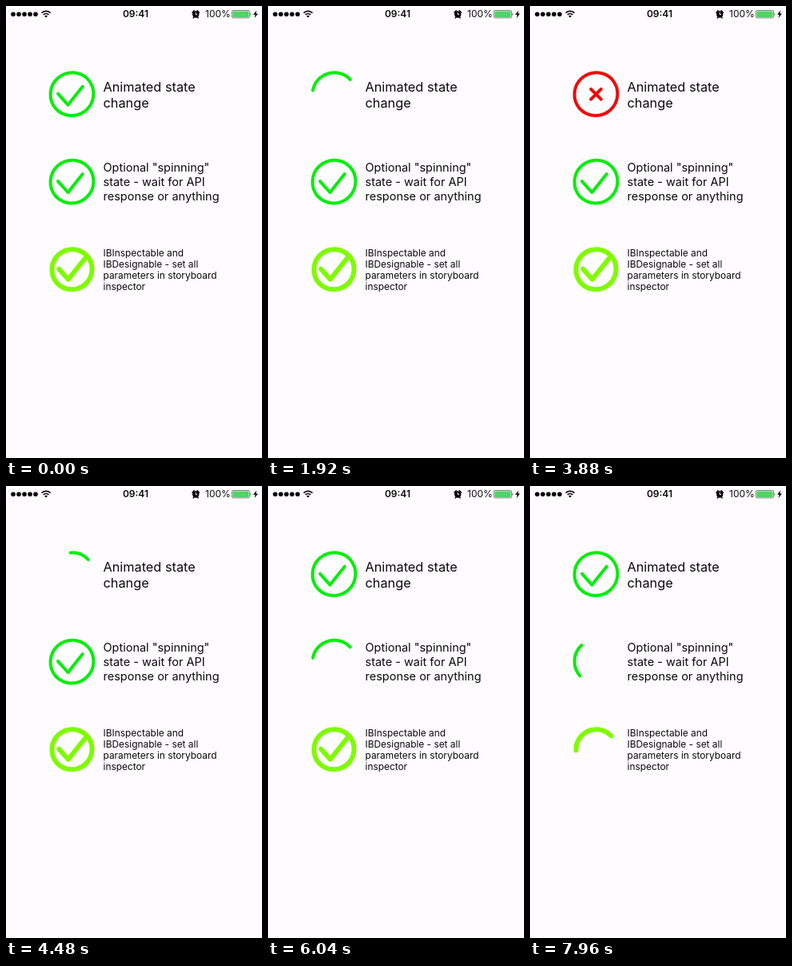
An HTML page that plays this animation: 320 by 565 pixels, repeating every 8000 ms.

```html
<!DOCTYPE html>
<html lang="en">
<head>
<meta charset="utf-8">
<title>State switches</title>
<style>
  html, body { margin: 0; width: 100%; height: 100%; overflow: hidden; background: #fefcfe; }
  svg { display: block; width: 100%; height: 100%; }
  text { font-family: Inter, Roboto, sans-serif; fill: #0a0a0a; }
  .switch path { fill: none; stroke-linecap: round; stroke-linejoin: round; }
</style>
</head>
<body>
<svg id="stage" viewBox="0 0 320 565">
  <g id="status">
    <g fill="none" stroke="#0a0a0a" stroke-width="1.7">
      <path d="M44.6 8.6a7.8 7.8 0 0 1 11 0M46.8 10.9a4.7 4.7 0 0 1 6.6 0"/>
    </g>
    <path d="M50.1 14.6l-1.9-2a2.7 2.7 0 0 1 3.8 0z"/>
    <text x="162" y="14.3" font-size="12" font-weight="600" text-anchor="middle">09:41</text>
    <circle cx="237.2" cy="10.5" r="4.2"/>
    <path d="M233 8.2l2.2-2.4M241.4 8.2l-2.2-2.4M234.3 14.8l1-1.4M240.1 14.8l-1-1.4" stroke="#0a0a0a" stroke-width="1.6" stroke-linecap="round"/>
    <path d="M237.2 8v2.7h2" fill="none" stroke="#fefcfe"/>
    <text x="249" y="14.3" font-size="12">100%</text>
    <rect x="282.2" y="5.5" width="22.4" height="9.4" rx="1.8" fill="#fefcfe" stroke="#5b6a5e" stroke-width=".8"/>
    <rect x="283.2" y="6.5" width="20.4" height="7.4" rx="1" fill="#4fd465"/>
    <path d="M305.6 8.4q1.5 1.8 0 3.6z"/>
    <path d="M313.2 5.4l-4.2 5.4h2.6l-1 4.2 4.4-5.6h-2.7z"/>
  </g>
</svg>
<script>
const LOOP = 8000;
const MARK = 200;     // time to draw or withdraw a check or cross
const RING = 420;     // time to draw or withdraw a ring
const SPIN_ARC = 0.25;
const SPIN_TURN = 500;
const GREEN = '#03ee0b', LIME = '#7ffb00', RED = '#f00a0a';

const stage = document.getElementById('stage');
const clamp = x => Math.min(1, Math.max(0, x));

function add(parent, tag, attrs, text) {
  const el = document.createElementNS('http://www.w3.org/2000/svg', tag);
  for (const key in attrs) el.setAttribute(key, attrs[key]);
  if (text) el.textContent = text;
  parent.append(el);
  return el;
}

for (let i = 0; i < 5; i++) {
  add(document.getElementById('status'), 'circle', { cx: 9 + 7 * i, cy: 10.2, r: 2.8 });
}

function label(lines, y, size, leading) {
  lines.forEach((line, i) =>
    add(stage, 'text', { x: 121.5, y: y + i * leading, 'font-size': size }, line));
}

label(['Animated state', 'change'], 106.5, 16.3, 20);
label(['Optional "spinning"', 'state - wait for API', 'response or anything'], 207.3, 14.5, 17.8);
label(['IBInspectable and', 'IBDesignable - set all', 'parameters in storyboard', 'inspector'], 313, 11.9, 14.1);

// Ring starts at the upper right, runs counter-clockwise, then leads into the check.
function makeSwitch({ y, r, width, color, trim }) {
  const group = add(stage, 'g', { class: 'switch', transform: `translate(82.5 ${y})`, 'stroke-width': width });
  const tipX = r * 0.743, tipY = -r * 0.669;
  const stroke = d => add(group, 'path', { d, pathLength: 1 });
  const ring = stroke(`M${tipX} ${tipY}A${r} ${r} 0 0 0 ${-tipX} ${-tipY}A${r} ${r} 0 0 0 ${tipX} ${tipY}`);
  const check = stroke(`M${tipX} ${tipY}L${-0.183 * r} ${0.49 * r}L${-0.64 * r} ${-0.02 * r}`);
  const cross = add(group, 'path', { stroke: RED });
  return { ring, check, cross, color, trim };
}

function showPart(path, from, to, color) {
  path.style.display = to - from > 0.001 ? '' : 'none';
  path.setAttribute('stroke', color);
  path.setAttribute('stroke-dasharray', `${to - from} 3`);
  path.setAttribute('stroke-dashoffset', -from);
}

function draw(sw, { ring, check = 0, cross = 0, color = sw.color, turn = 0 }) {
  showPart(sw.ring, 0, ring, color);
  sw.ring.setAttribute('transform', `rotate(${turn})`);
  showPart(sw.check, sw.trim * check * check, check, color);
  const h = 10.7 * cross;
  sw.cross.style.display = cross > 0 ? '' : 'none';
  sw.cross.setAttribute('d', `M${-h} ${-h}L${h} ${h}M${h} ${-h}L${-h} ${h}`);
}

// Elapsed time from a full check (0) to a full cross (2 * MARK + 2 * RING).
function checkToCross(ms) {
  const half = MARK + RING;
  if (ms < half) return { check: 1 - clamp(ms / MARK), ring: 1 - clamp((ms - MARK) / RING) };
  return { color: RED, ring: clamp((ms - half) / RING), cross: clamp((ms - half - RING) / MARK) };
}

function checkToSpin(ms) {
  const spinning = Math.max(0, ms - MARK - RING * (1 - SPIN_ARC));
  return {
    check: 1 - clamp(ms / MARK),
    ring: Math.max(SPIN_ARC, 1 - clamp((ms - MARK) / RING)),
    turn: 360 * spinning / SPIN_TURN
  };
}

const first = makeSwitch({ y: 110.2, r: 27.3, width: 4, color: GREEN, trim: 0.19 });
const second = makeSwitch({ y: 219.6, r: 27.3, width: 4, color: GREEN, trim: 0.19 });
const third = makeSwitch({ y: 329.2, r: 25.4, width: 6, color: LIME, trim: 0.06 });

function render(t) {
  const full = 2 * (MARK + RING);
  draw(first, checkToCross(t < 3800 ? t - 1450 : full - (t - 3800)));
  draw(second, checkToSpin(t - 5570));
  draw(third, checkToSpin(t - 7505));
}

const start = performance.now();
function tick() {
  render((performance.now() - start) % LOOP);
  requestAnimationFrame(tick);
}
tick();
</script>
</body>
</html>
```
